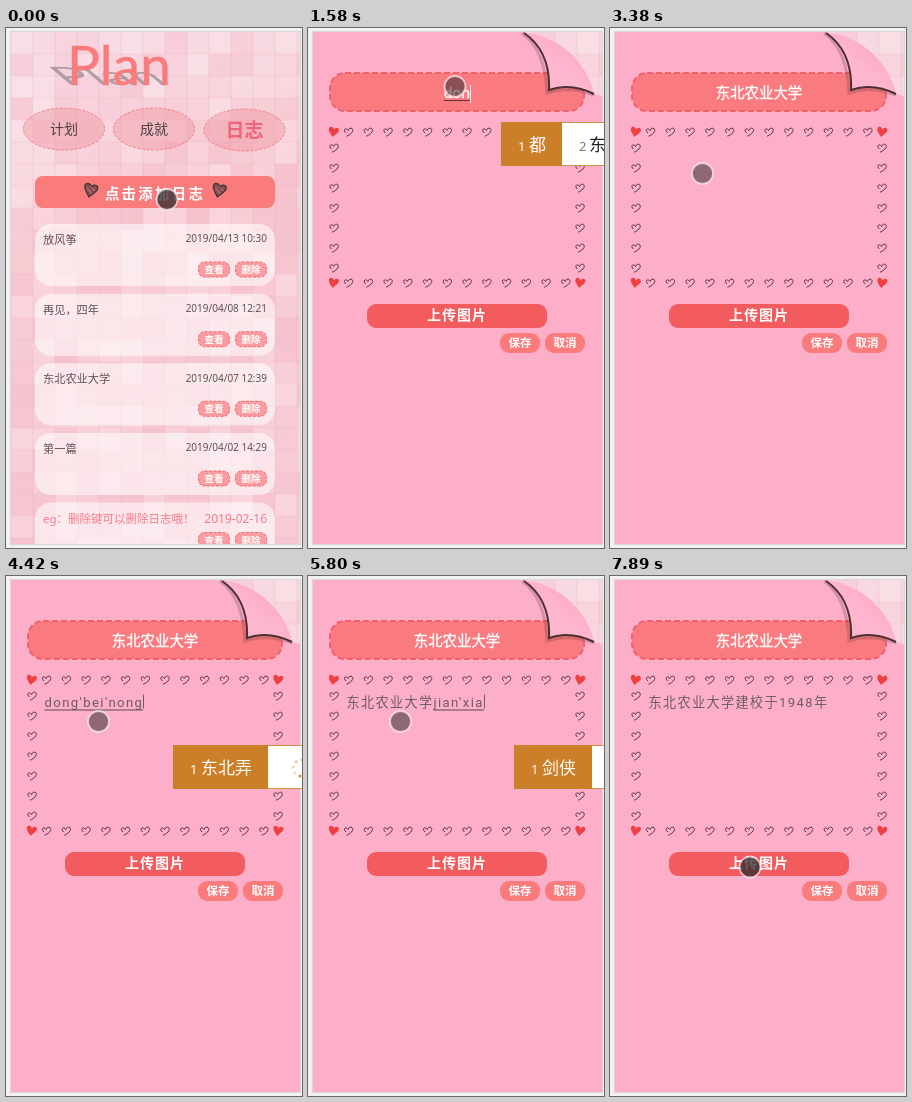
An HTML page that plays this animation: 296 px wide and 520 px high, repeating every 8 s.

```html
<!DOCTYPE html>
<html lang="zh-CN">
<head>
<meta charset="utf-8">
<style>
  html, body { margin: 0; width: 100%; height: 100%; overflow: hidden; background: #f2f1f1; }
  svg { display: block; width: 296px; height: 520px; }
  text { font-family: "Noto Sans", "Noto Sans CJK SC", "Noto Sans CJK", sans-serif; white-space: pre; }
  #note text { font-family: Roboto, "Noto Sans CJK SC", "Noto Sans CJK", sans-serif; letter-spacing: 1.4px; }
  #list .logo { font: 55px Lato, sans-serif; }
</style>
</head>
<body>
<svg id="stage" viewBox="0 0 296 520"></svg>
<script>
const LOOP = 8000, OPEN = 610;
const SALMON = '#f97b7b', WHITE = '#fff';

// ---- drawing helpers (text y is the middle of the line) ----
const text = (x, y, s, size, fill, more = '') =>
  `<text x="${x}" y="${y + size * .37}" font-size="${size}" fill="${fill}" ${more}>${s}</text>`;
const MID = 'text-anchor="middle"', END = 'text-anchor="end"', BOLD = 'font-weight="700"';
const box = (x, y, w, h, r, fill, more = '') =>
  `<rect x="${x}" y="${y}" width="${w}" height="${h}" rx="${r}" fill="${fill}" ${more}/>`;
const heart = (x, y, scale, turn, style) =>
  `<path d="M0 5C-3 2-5.500-.500-5-3C-4.500-5.500-1-5.500 0-2.500C1-5.500 5-5.500 5-2.500C5 0 2 2 0 5Z" transform="translate(${x} ${y}) rotate(${turn}) scale(${scale})" ${style}/>`;
// open heart drawn with one pen stroke
const loop = (x, y) =>
  `<path d="M-2.500 1C-6-1.500-3-5.500-.500-1.500C.500-5 5.500-4.500 4-.500C3 1.800 0 3.500-2 4.200" transform="translate(${x} ${y})" fill="none" stroke="#4b2f3a" stroke-width=".95"/>`;

function mosaic() {
  let seed = 11, out = box(5, 4, 289, 512, 0, 'url(#wall)');
  const rnd = () => (seed = seed * 16807 % 2147483647) / 2147483647;
  for (let y = 4; y < 516; y += 22)
    for (let x = 5; x < 294; x += 22) {
      const tint = rnd() < .5 ? '#fff' : '#ee9fb4';
      out += box(x, y, 22, 22, 0, tint, `fill-opacity="${(rnd() * .22).toFixed(2)}" stroke="#e9a9b8" stroke-opacity=".22" stroke-width=".7"`);
    }
  return out;
}

function tab(x, y, label, active) {
  return `<ellipse cx="${x}" cy="${y}" rx="40.500" ry="21" fill="#ee8f9b" fill-opacity=".42" stroke="#f4808a" stroke-dasharray="3 1.500"/>` +
    text(x, y, label, active ? 19 : 14, active ? '#ee6478' : '#4a4144', MID + (active ? ' ' + BOLD : ''));
}

function card(y, title, date, sample) {
  const color = sample ? '#f47d8b' : '#5d5356';
  const top = y + (sample ? 30 : 38);
  const button = (x, label) =>
    box(x, top, 31, 15, 6, '#f99da0', 'stroke="#f2686e" stroke-dasharray="3 1.500"') +
    text(x + 15.5, top + 7.5, label, 9.5, WHITE, MID + ' ' + BOLD);
  return box(29, y, 240, 62, 16, WHITE, 'fill-opacity=".56"') +
    text(37, y + 16, title, sample ? 11.5 : 11.2, color) +
    text(261, y + (sample ? 16 : 14.5), date, sample ? 12 : 10, color, END) +
    button(192.5, '查看') + button(229.5, '删除');
}

function listPage() {
  const ink = 'fill="#3d3538" fill-opacity=".6" stroke="#3d3538" stroke-width="1"';
  return `<text class="logo" fill="#8b7f86" fill-opacity=".65" transform="translate(60 57) skewX(50) scale(1 .46)">Plan</text>
    <text class="logo" x="61" y="57" fill="${SALMON}" stroke="${SALMON}" stroke-width=".4">Plan</text>` +
    tab(58, 101, '计划') + tab(148, 101, '成就') + tab(238.5, 102, '日志', true) +
    box(29, 148, 240, 32, 8, SALMON) +
    text(149, 165.8, '点击添加日志', 14.5, WHITE, MID + ' ' + BOLD + ' letter-spacing="2.200"') +
    heart(84.5, 162.5, 1.3, 14, ink) + heart(213, 162.5, 1.3, 14, ink) +
    '<path d="M81 160l5 6M84 158l5 5M209.500 160l5 6M212.500 158l5 5" stroke="#f97b7b" stroke-width=".8"/>' +
    card(196, '放风筝', '2019/04/13 10:30') +
    card(265.7, '再见，四年', '2019/04/08 12:21') +
    card(335.3, '东北农业大学', '2019/04/07 12:39') +
    card(405, '第一篇', '2019/04/02 14:29') +
    card(474.5, 'eg：删除键可以删除日志哦！', '2019-02-16', true);
}

function heartFrame() {
  let out = '';
  for (const y of [104, 255]) {
    for (const x of [25.5, 272]) out += heart(x, y, 1, 10, 'fill="#ee4040"');
    for (let i = 0; i < 12; i++) out += loop(40.5 + i * 19.75, y);
  }
  for (const x of [26, 272])
    for (let y = 120; y <= 240; y += 20) out += loop(x, y);
  return out;
}

function peel() {
  return `<g clip-path="url(#corner)"><use href="#wallpaper"/></g>
    <path d="M214 5C232 18 238 40 239 65C254 60 270 61 286 67" fill="none" stroke="#65303f" stroke-opacity=".25" stroke-width="3"/>
    <path d="M216 5C255 9 280 38 286 66C270 58 255 57 241 62C242 38 235 18 216 5Z" fill="url(#fold)"/>
    <path d="M216 5C235 18 242 38 241 62C255 57 270 58 286 66" fill="none" stroke="#4a3030" stroke-width="2"/>`;
}

function editPage() {
  const small = (x, label) => box(x, 305, 40, 20, 9, SALMON) + text(x + 20, 314.5, label, 11.5, WHITE, MID + ' ' + BOLD);
  return box(5, 4, 289, 512, 0, '#fdaec8') +
    box(22, 45, 254, 38, 15, '#f97b7f', 'stroke="#f1606b" stroke-width="2" stroke-dasharray="6 3"') +
    heartFrame() +
    box(59, 276, 180, 24, 9, '#f25c5e') +
    text(149, 287, '上传图片', 14, WHITE, MID + ' ' + BOLD + ' letter-spacing="1"') +
    small(192, '保存') + small(237, '取消') +
    '<g id="title"></g><g id="note"></g>' + peel();
}

const stage = document.getElementById('stage');
stage.innerHTML = `<defs>
    <linearGradient id="wall" x1="0" y1="0" x2=".2" y2="1">
      <stop offset="0" stop-color="#f7dae4"/><stop offset=".25" stop-color="#f8d5dd"/>
      <stop offset=".45" stop-color="#f7cad2"/><stop offset="1" stop-color="#f7ccd5"/>
    </linearGradient>
    <linearGradient id="fold" x1="0" y1="1" x2="1" y2="0">
      <stop offset="0" stop-color="#fbb0ca"/><stop offset=".45" stop-color="#ffb7d0"/><stop offset="1" stop-color="#f79fbd"/>
    </linearGradient>
    <clipPath id="screen"><rect x="5" y="4" width="289" height="512"/></clipPath>
    <clipPath id="corner"><path d="M216 4H294V68L286 66C280 38 255 9 216 4Z"/></clipPath>
  </defs>
  <rect x="4.500" y="3.500" width="290" height="513" fill="none" stroke="#dcd6d8"/>
  <g clip-path="url(#screen)">
    <g id="wallpaper">${mosaic()}</g>
    <g id="list">${listPage()}</g>
    <g id="edit">${editPage()}</g>
  </g>
  <g id="ime"></g>
  <circle id="cursor" r="10.500" fill="#2b2a2e" stroke="#fff0f3" stroke-opacity=".7" stroke-width="1.800"/>`;
const [list, edit, title, note, ime, cursor] =
  ['list', 'edit', 'title', 'note', 'ime', 'cursor'].map(id => document.getElementById(id));

// ---- script of the session ----
const SCHOOL = '东北农业大学', FOUNDED = SCHOOL + '建校于';
const titleText = [[0, ''], [3180, SCHOOL]];
const noteText = [[0, ''], [5000, SCHOOL], [6100, FOUNDED], [6210, FOUNDED + '1'], [6310, FOUNDED + '19'],
  [6410, FOUNDED + '194'], [6510, FOUNDED + '1948'], [7090, FOUNDED + '1948年']];
// pinyin, key times, commit time, gap between caret and candidates
const typing = [
  { field: title, keys: "dong'bei'nong'ye'd", end: 3180, gap: 31,
    at: [1380, 1480, 1560, 1680, 1900, 2000, 2180, 2380, 2480, 2580, 2680, 2800, 2920, 3060] },
  { field: note, keys: "dong'bei'nong'ye'd", end: 5000, gap: 30,
    at: [3500, 3600, 3700, 3790, 3880, 3960, 4100, 4200, 4270, 4340, 4410, 4560, 4680, 4820] },
  { field: note, keys: "jian'xiao'yu", end: 6100, gap: 30,
    at: [5290, 5380, 5470, 5560, 5650, 5710, 5780, 5850, 5930, 6010] },
  { field: note, keys: 'nian', end: 7090, gap: 48, at: [6690, 6790, 6890, 6980] }
];
const choices = {
  d: '的 大', do: '都 多', don: '都 东', dong: '东 动', "dong'b": '东北 东边', "dong'be": '东北', "dong'bei": '东北 冬被',
  "dong'bei'n": '东北农', "dong'bei'no": '东北农', "dong'bei'non": '东北农', "dong'bei'nong": '东北弄',
  "dong'bei'nong'y": '东北农业', "dong'bei'nong'ye": '东北农业', "dong'bei'nong'ye'd": SCHOOL,
  j: '就 家', ji: '几 级', jia: '家 加', jian: '见 建', "jian'x": '见效', "jian'xi": '间隙', "jian'xia": '剑侠',
  "jian'xiao": '建校 见效', "jian'xiao'y": '建校于', "jian'xiao'yu": '建校于',
  n: '你 那', ni: '你 呢', nia: '年 念', nian: '年 念'
};
const path = [[0, 161, 171.5], [179, 161, 171.5], [180, 159, 169], [700, 159, 169], [1200, 147, 58.5], [3200, 147, 58.5],
  [3360, 92.5, 145.5], [7100, 92.5, 145.5], [7200, 105, 158], [7370, 140, 291], [LOOP, 140, 291]];

const latest = (rows, t) => rows.filter(r => r[0] <= t).pop()[1];

function place(t) {
  const i = path.findIndex(p => p[0] > t), [a, b] = [path[i - 1], path[i]];
  const k = (t - a[0]) / (b[0] - a[0]);
  return [a[1] + (b[1] - a[1]) * k, a[2] + (b[2] - a[2]) * k];
}

// Draws a field and returns the caret's x
function drawField(field, done, comp, caretOn) {
  const isTitle = field === title;
  const size = isTitle ? 14.4 : 13.1, y = isTitle ? 65 : 126.5, fill = isTitle ? WHITE : '#6b5c62';
  field.innerHTML = text(0, y, done + comp, size, fill, isTitle ? 'stroke="#fff" stroke-width=".35"' : '');
  const el = field.firstChild, width = done + comp ? el.getComputedTextLength() : 0;
  const x = isTitle ? 149 - width / 2 : 38.5;
  el.setAttribute('x', x);
  const start = x + (done && comp ? el.getSubStringLength(0, done.length) : 0), end = Math.round(x + width);
  if (comp) field.innerHTML += box(start, y + 7, end - start, 1, 0, isTitle ? '#5e3237' : '#5d4c53');
  if (caretOn) field.innerHTML += box(end, y - 8, 1, isTitle ? 18 : 14, 0, isTitle ? '#ffe9ea' : '#6b5c62');
  return end;
}

function drawIme(x, y, comp, t) {
  const [first, second] = choices[comp].split(' '), w = 44 + 17 * first.length;
  let out = box(x + .5, y + .5, 200, 43, 0, WHITE, 'stroke="#cf9145"') + box(x, y, w, 44, 0, '#cb7f28') +
    text(x + 17, y + 24, '1', 13, WHITE) + text(x + 28, y + 23, first, 17, WHITE);
  if (second) out += text(x + w + 17, y + 24, '2', 13, '#777') + text(x + w + 27, y + 23, second, 17, '#222');
  else for (let i = 0; i < 8; i++) {
    const a = i * Math.PI / 4 + t / 160;
    out += `<circle cx="${x + w + 33 + 8 * Math.cos(a)}" cy="${y + 23 + 8 * Math.sin(a)}" r="1.500" fill="#d08a38" opacity="${.3 + i * .1}"/>`;
  }
  ime.innerHTML = out;
}

function draw(t) {
  const editing = t >= OPEN;
  list.style.display = editing ? 'none' : '';
  edit.style.display = editing ? '' : 'none';
  ime.innerHTML = '';
  if (editing) {
    const now = typing.find(p => t >= p.at[0] && t < p.end);
    const comp = now ? now.keys.match(/'?[a-z]/g).slice(0, now.at.filter(k => k <= t).length).join('') : '';
    const compIn = f => now && now.field === f ? comp : '';
    const ends = new Map([
      [title, drawField(title, latest(titleText, t), compIn(title), t > 1250 && t < 3180)],
      [note, drawField(note, latest(noteText, t), compIn(note), t > 3450 && t < 7710)]
    ]);
    if (now) drawIme(ends.get(now.field) + now.gap, now.field === title ? 94 : 169, comp, t);
  }
  const [x, y] = place(t);
  const pressed = t < 180 || (t >= 430 && t < 700) || (t >= 7380 && t < 7550) || t >= 7890;
  cursor.setAttribute('cx', x);
  cursor.setAttribute('cy', y);
  cursor.setAttribute('fill-opacity', pressed ? .74 : .53);
}

let begin;
function tick(now) {
  begin ??= now;
  draw((now - begin) % LOOP);
  requestAnimationFrame(tick);
}
draw(0);
requestAnimationFrame(tick);
</script>
</body>
</html>
```
